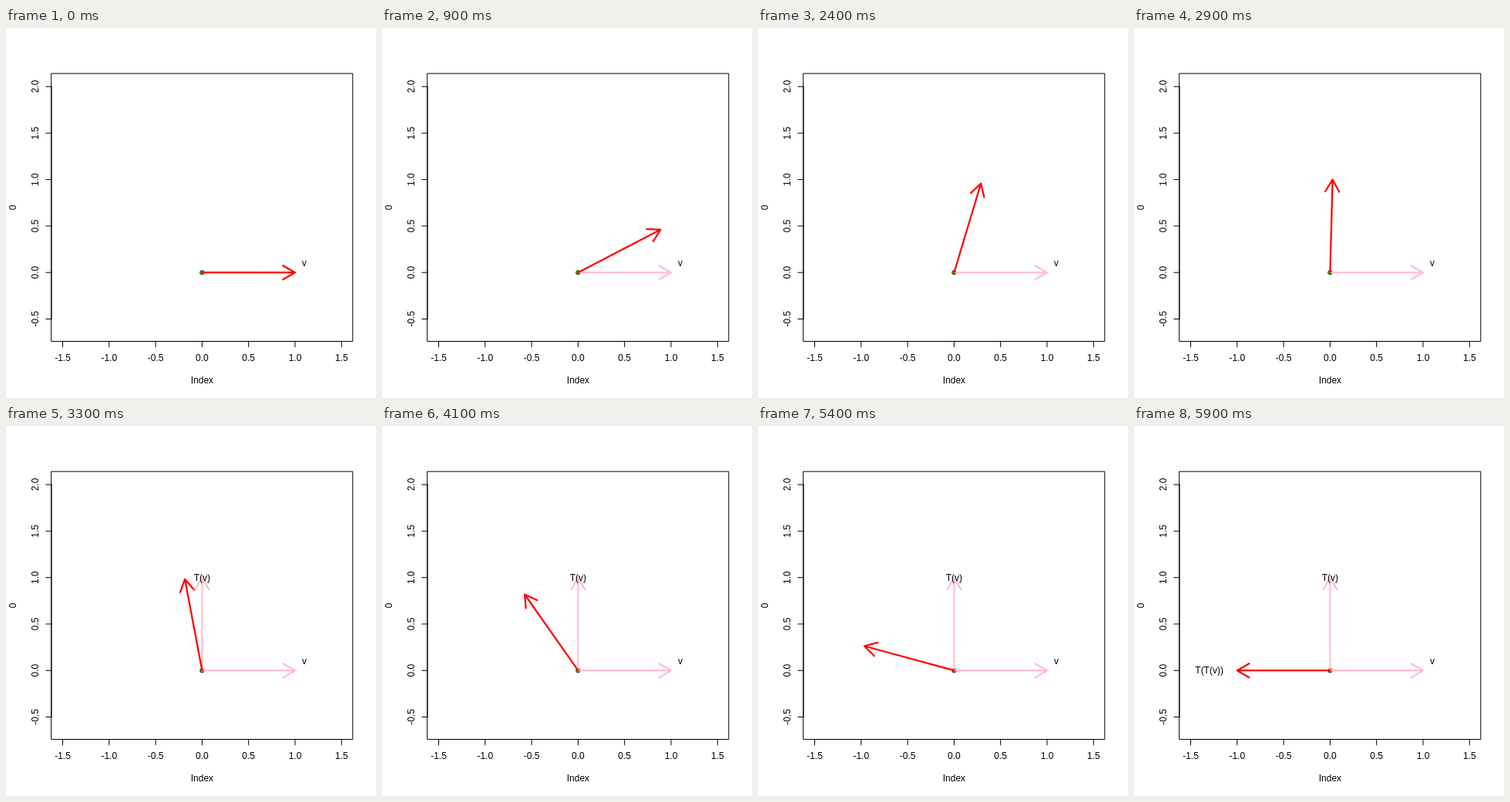
Animation, 480 px wide and 480 px high, one loop 6.5 s. Source, as an HTML page:

```html
<!DOCTYPE html>
<html>
<head>
<meta charset="utf-8">
<style>
  html, body { margin: 0; width: 100%; height: 100%; overflow: hidden; background: #fff; }
  svg { display: block; width: 100vw; height: 100vh; }
  text { font: 12px "Liberation Sans", Arial, Helvetica, sans-serif; text-anchor: middle; fill: #000; }
  path, rect { fill: none; stroke: #000; stroke-linecap: round; stroke-linejoin: round; }
  .arrow { stroke-width: 2.25; }
</style>
</head>
<body>
<svg id="stage" viewBox="0 0 480 480"></svg>
<script>
const LOOP = 6500, STEP = 100, LAST = 59;
const UNIT = 120.59, LEFT = 59.04, RIGHT = 449.76, TOP = 59.04, BOTTOM = 406.56;
const stage = document.getElementById('stage');
const px = x => 254.4 + x * UNIT;
const py = y => 317.2 - y * UNIT;

function add(tag, attrs, content) {
  const el = document.createElementNS('http://www.w3.org/2000/svg', tag);
  for (const k in attrs) el.setAttribute(k, attrs[k]);
  if (content) el.textContent = content;
  stage.appendChild(el);
  return el;
}

const label = (s, x, y) => add('text', { x, y }, s);
const sideLabel = (s, x, y) => add('text', { transform: `translate(${x} ${y}) rotate(-90)` }, s);
const textAt = (s, x, y) => label(s, px(x), py(y) + 4);

// Unit vector from the origin with an open 30 degree head
function arrowPath(angle) {
  const x = px(Math.cos(angle)), y = py(Math.sin(angle));
  const barb = turn => {
    const a = angle + turn * Math.PI / 6;
    return `${x - 18 * Math.cos(a)} ${y + 18 * Math.sin(a)}`;
  };
  return `M${px(0)} ${py(0)}L${x} ${y}M${barb(1)}L${x} ${y}L${barb(-1)}`;
}
const arrow = (angle, stroke) => add('path', { class: 'arrow', d: arrowPath(angle), style: `stroke:${stroke}` });

function drawAxes() {
  add('rect', { x: LEFT, y: TOP, width: RIGHT - LEFT, height: BOTTOM - TOP });
  let d = `M${px(-1.5)} ${BOTTOM}H${px(1.5)}M${LEFT} ${py(-0.5)}V${py(2)}`;
  for (let v = -1.5; v <= 2; v += 0.5) {
    if (v <= 1.5) {
      d += `M${px(v)} ${BOTTOM}v7.2`;
      label(v.toFixed(1), px(v), 432);
    }
    if (v >= -0.5) {
      d += `M${LEFT} ${py(v)}h-7.2`;
      sideLabel(v.toFixed(1), 42, py(v));
    }
  }
  add('path', { d });
  label('Index', px(0), 461);
  sideLabel('0', 13, 232.8);
}

drawAxes();
add('circle', { cx: px(0), cy: py(0), r: 2.7, fill: '#00d000', stroke: '#004000' });
arrow(0, '#ffc0cb');
textAt('v', 1.1, 0.1);
const once = [arrow(Math.PI / 2, '#ffc0cb'), textAt('T(v)', 0, 1)];
const twice = textAt('T(T(v))', -1.3, 0);
const hand = arrow(0, '#f00');

const show = (el, on) => el.setAttribute('visibility', on ? 'visible' : 'hidden');

function render(ms) {
  const i = Math.min(LAST, Math.floor(ms % LOOP / STEP));
  hand.setAttribute('d', arrowPath(Math.PI * i / LAST));
  once.forEach(el => show(el, i > LAST / 2));
  show(twice, i === LAST);
}

const start = performance.now();
function tick() {
  render(performance.now() - start);
  requestAnimationFrame(tick);
}
tick();
</script>
</body>
</html>
```
